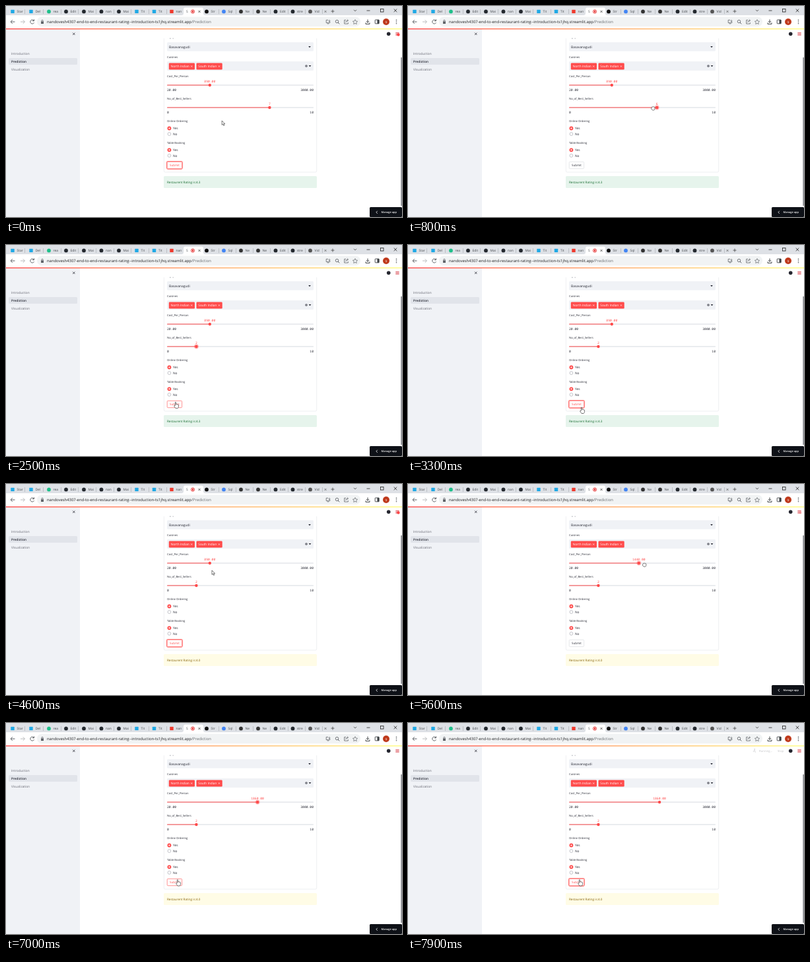
Write an HTML page that moves like this. It is 600 px wide and 320 px high and loops after 8 s.

```html
<!DOCTYPE html>
<html lang="en">
<head>
<meta charset="utf-8">
<title>Rating form</title>
<style>
html, body { margin: 0; width: 100%; height: 100%; overflow: hidden; background: #fff; }
svg { display: block; width: 600px; height: 320px; }
text { font-family: "Open Sans", "Noto Sans", sans-serif; text-rendering: geometricPrecision; white-space: pre; }
.mono { font-family: "Noto Sans Mono", "DejaVu Sans Mono", monospace; }
</style>
</head>
<body>
<svg id="stage" viewBox="0 0 600 320">
  <linearGradient id="glow">
    <stop offset="0" stop-color="#ff4b4b"/>
    <stop offset="1" stop-color="#fffd80"/>
  </linearGradient>
</svg>
<script>
const stage = document.getElementById("stage");
const RED = "#ff4b4b", INK = "#262833", GREY = "#5f6368", PANEL = "#f0f2f6";
const DURATION = 8000;

function add(tag, attrs, parent = stage) {
  const el = document.createElementNS("http://www.w3.org/2000/svg", tag);
  set(el, attrs);
  parent.appendChild(el);
  return el;
}
function set(el, attrs) {
  for (const k in attrs) el.setAttribute(k, attrs[k]);
}
const rect = (x, y, width, height, fill, rx = 0, more = {}) =>
  add("rect", { x, y, width, height, fill, rx, ...more });
const circle = (cx, cy, r, fill, more = {}) => add("circle", { cx, cy, r, fill, ...more });
const line = (d, stroke, w = 0.8, more = {}) =>
  add("path", { d, stroke, "stroke-width": w, fill: "none", ...more });
function text(str, x, y, size, fill = INK, more = {}) {
  const el = add("text", { x, y, "font-size": size, fill, ...more });
  el.textContent = str;
  return el;
}
const cross = (x, y, r, color, w) =>
  line(`M${x - r} ${y - r}l${2 * r} ${2 * r}m0 ${-2 * r}l${-2 * r} ${2 * r}`, color, w);
const caret = (x, y) => add("path", { d: `M${x - 1.8} ${y - 1}h3.6l-1.8 2.2z`, fill: INK });

// Browser tabs
const BLUE = "#20a9e5", DARK = "#24292f";
function drawTabs() {
  rect(0, 0, 600, 14, "#dee1e6");
  add("path", { d: "M266 14q3 0 3-3V5q0-2.5 2.5-2.5h25q2.5 0 2.5 2.5v6q0 3 3 3z", fill: "#fff" });
  const tabs = [
    [10, BLUE, "Star"], [38, BLUE, "Del"], [65, "#1fc08a", "rea"], [91, DARK, "Edit"],
    [118, DARK, "Mai"], [144.5, DARK, "nan"], [171, DARK, "Mai"], [198, BLUE, "Tit"],
    [224.5, BLUE, "Tit"], [251, "#ef3a2d", "nan"], [304, "#111", "Str"], [330, "#4285f4", "Sql"],
    [356, "#333", "Ne"], [382, "#333", "Ne"], [408.5, DARK, "Edit"], [434.5, DARK, "stre"],
    [461, "#555", "Vid"]
  ];
  tabs.forEach(([x, color, name], i) => {
    if (color === BLUE || color === "#ef3a2d") rect(x - 2.7, 5.7, 5.4, 5.4, color, 0.6);
    else circle(x, 8.4, 2.9, color);
    text(name, x + 6.5, 10.2, 4.9, "#45494d");
    if (i !== 9) rect(x + 18.5, 5, 0.5, 7, "#9da1a6");
  });
  text("S", 273, 10.2, 4.9, "#45494d");
  circle(283, 8.4, 2.6, "none", { stroke: "#e52b2b", "stroke-width": 0.9 });
  circle(283, 8.4, 1.3, "#e52b2b");
  cross(293, 8.4, 1.6, "#444", 0.8);
  cross(484, 8.4, 1.5, "#555", 0.7);
  line("M492.5 8h5m-2.5-2.5v5", "#444");
  line("M527 5.8l2 2 2-2", "#333");
  line("M546.5 7h5", "#222");
  rect(567.5, 4.5, 4.5, 4.5, "none", 0, { stroke: "#222", "stroke-width": 0.8 });
  cross(590, 6.8, 2.3, "#222", 0.8);
}

// Toolbar with the address
function drawToolbar() {
  rect(0, 14, 600, 20, "#fff");
  rect(47, 16.5, 490, 14.5, "#f1f3f4", 7.2);
  line("M13.5 24h-6.5m2.8-2.8l-2.8 2.8 2.8 2.8", GREY, 1);
  line("M22 24h6.5m-2.8-2.8l2.8 2.8-2.8 2.8", "#babcbe", 1);
  line("M42.3 22.3a3 3 0 1 0 .2 3m0-5v2.4h-2.4", GREY, 1);
  rect(53, 23.3, 4, 3.7, GREY, 0.5);
  line("M53.8 23.5v-1.1a1.2 1.2 0 0 1 2.4 0v1.1", GREY);
  const url = text("", 62, 26, 5.9, "#202124");
  add("tspan", {}, url).textContent =
    "nandovesh4307-end-to-end-restaurant-rating--introduction-ts1jhq.streamlit.app";
  add("tspan", { fill: "#686c70" }, url).textContent = "/Prediction";

  line("M488 21.3h-2.8v4.2h5.600v-1.500m-4.200 2.900h2.800m.6-6v3m-1.300-1.300l1.300 1.300 1.300-1.300", GREY);
  circle(501.5, 23.5, 2.2, "none", { stroke: GREY, "stroke-width": 0.9 });
  line("M503 25l2.3 2.3", GREY, 1);
  line("M515 21.3h-2.3v5.7h5.6v-2m-3.6 0q0-3 3.6-3m-1.6-1.7l1.8 1.7-1.8 1.7", GREY);
  line("M529 20.6l1.1 2.3 2.5.3-1.8 1.8.4 2.5-2.2-1.2-2.2 1.2.4-2.5-1.8-1.8 2.5-.3z", GREY, 0.7);
  line("M548 20.5v4.5m-2-1.8l2 2 2-2m-5 2.2v1.9h6v-1.9", "#3c4043", 1);
  rect(559.2, 21, 6, 5.8, "none", 0.6, { stroke: "#3c4043", "stroke-width": 0.9 });
  rect(562.5, 21, 2.7, 5.8, "#3c4043");
  circle(576, 24, 5, "#bf3a1c");
  text("s", 576, 25.9, 5.5, "#fff", { "text-anchor": "middle" });
  for (const y of [21.4, 24, 26.6]) circle(591.5, y, 0.8, GREY);
}

function drawSidebar() {
  rect(0, 34, 112, 286, PANEL);
  cross(102.8, 42.3, 1.7, INK, 0.8);
  rect(4, 79, 104, 10, "#e1e4ea", 1.5);
  text("Introduction", 8, 74, 4.8, "#686a74");
  text("Prediction", 8, 86, 4.7, INK, { "font-weight": 600 });
  text("Visualization", 8, 98, 4.8, "#686a74");
}

function tag(x, width, name) {
  rect(x, 86.5, width, 10, RED, 1.3);
  text(name, x + 2.8, 93.3, 4.75, "#fff");
  cross(x + width - 4.8, 91.5, 1.1, "#fff", 0.6);
}

function makeSlider(y, min, max, label) {
  text(label, 244, y - 12.1, 4.2);
  rect(244, y - 0.6, 222, 1.2, "#d6dadf", 0.6);
  const fill = rect(244, y - 0.6, 10, 1.2, RED, 0.6);
  const halo = circle(0, y, 3.4, RED, { opacity: 0.4 });
  const thumb = circle(0, y, 2.2, RED);
  const value = text("", 0, y - 4, 4.7, RED, { class: "mono", "text-anchor": "middle" });
  text(min, 244, y + 8.9, 4.7, INK, { class: "mono" });
  text(max, 466, y + 8.9, 4.7, INK, { class: "mono", "text-anchor": "end" });
  return (x, str, focused) => {
    set(fill, { width: x - 244 });
    set(thumb, { cx: x });
    set(halo, { cx: x, visibility: focused ? "visible" : "hidden" });
    set(value, { x });
    value.textContent = str;
  };
}

function radio(y, label) {
  text(label, 244, y - 9.3, 4.2);
  circle(247.4, y, 2.9, RED);
  circle(247.4, y, 1.1, "#fff");
  text("Yes", 253, y + 1.8, 4.8);
  circle(247.4, y + 8.6, 2.4, "#fff", { stroke: "#a9abb3", "stroke-width": 0.7 });
  text("No", 253, y + 10.4, 4.8);
}

drawTabs();
drawToolbar();
drawSidebar();
rect(0, 34, 600, 1.4, "url(#glow)");

// Form
line("M239.3 49v201q0 2 2 2h227.4q2 0 2-2V49", "#e3e4e9", 0.6);
line("M248 49.2h1.6m3 0h1.2", "#8b8d96", 0.8);
rect(244, 55, 222, 13.5, PANEL, 1.5);
text("Basavanagudi", 247, 63.5, 4.9);
caret(460, 62);
text("Cuisines", 244, 79, 4.2);
rect(244, 84, 222, 14, PANEL, 1.5);
tag(246.8, 39.2, "North Indian");
tag(288.5, 39.2, "South Indian");
circle(455, 91, 1.8, "#5c5e68");
cross(455, 91, 0.6, "#fff", 0.4);
caret(460.5, 91);
const setCost = makeSlider(120, "20.00", "3000.00", "Cost_Per_Person");
const setSellers = makeSlider(154, "0", "10", "No_of_Best_Sellers");
radio(185.5, "Online Ordering");
radio(218.3, "Table Booking");
const ring = rect(243.5, 235.7, 23.8, 11.6, "none", 1.8, { stroke: "#ff8585", "stroke-width": 1.2 });
const button = rect(244.2, 236.3, 22.4, 10.4, "#fff", 1.3, { "stroke-width": 0.6 });
const submit = text("Submit", 255.4, 243.1, 4.5, INK, { "text-anchor": "middle" });
const resultBox = rect(239, 258, 232, 18, "#e6f4ec", 1.5);
const result = text("", 244, 268.6, 4.6);

// Page header and corner controls
circle(579.7, 42.3, 2.8, "#262730");
line("M590.3 40.6h5.4m-5.4 1.8h5.4m-5.4 1.8h5.4", "#d32c36", 0.8);
const pulse = circle(594.5, 43.5, 2.2, "#ff2b2b");
const running = add("g", { opacity: 0.28 });
running.append(
  circle(525.2, 39.8, 0.8, INK),
  line("M524.6 41.3l-1.4 2.6m1.4-2.6l1.8 1.2m-1.3.2l1.4 2", INK, 0.7),
  text("Running...", 532, 44, 4.3),
  text("Stop", 560, 44, 4.3)
);
rect(598.3, 78, 1.7, 225, "#8d8f94");
rect(551, 305, 49, 15, "#0e1117", 1.5);
line("M562.8 310.8l-1.9 2 1.9 2", "#fff", 0.8);
text("Manage app", 568.5, 314.4, 3.95, "#fff", { "font-weight": 600 });

// Pointers, drawn with the hot spot at the origin
const pointer = d => add("path", { d, fill: "#fff", stroke: "#222", "stroke-width": 0.6 });
const arrow = pointer("M0 0v6.4l1.5-1.3 1.1 2.4 1.1-.5-1.1-2.3h2z");
const hand = pointer("M-.8 5V.4q0-.8.7-.8t.7.8v2.7q.8-.5 1.4.1.8-.4 1.3.2 1-.3 1.1.8v2.2q0 1.8-1.2 2.6H0L-2.4 5.6q0-1 1.6-.6z");
const fist = pointer("M-2 0q.2-1.5 1.3-1.3.6-.7 1.3-.1.8-.4 1.3.3 1-.1 1 1v1.8q-.2 1.6-1.3 2h-2q-1.7-.9-2.1-2.2z");

// Pointer way points: time, x, y
const path = [
  [0, 327, 174], [500, 399, 154], [650, 399, 154], [1250, 288, 155], [1400, 288, 156],
  [1500, 290, 162], [2400, 255, 236], [2800, 263, 246.5], [3900, 263, 246.5], [4600, 312, 131],
  [4850, 308, 121], [5000, 308, 121], [5880, 381, 122], [6200, 381, 122],
  [6850, 260, 238], [8000, 260, 238]
];
function pointerAt(t) {
  const i = Math.max(1, path.findIndex(p => p[0] >= t));
  const [t0, x0, y0] = path[i - 1], [t1, x1, y1] = path[i];
  const k = (t - t0) / (t1 - t0);
  return [x0 + (x1 - x0) * k, y0 + (y1 - y0) * k];
}
const within = (t, a, b) => t >= a && t < b;
const clamp = (v, a, b) => Math.min(b, Math.max(a, v));
const show = (el, on) => set(el, { visibility: on ? "visible" : "hidden" });

function render(t) {
  const [x, y] = pointerAt(t);

  const sellers = t < 650 ? 7 : Math.round(clamp((pointerAt(Math.min(t, 1300))[0] - 244) / 22.2, 2, 7));
  setSellers(244 + sellers * 22.2, sellers, within(t, 600, 3200));

  const dragX = clamp(pointerAt(clamp(t - 100, 5000, 6200))[0], 308.8, 381);
  const cost = Math.round(((dragX - 244) / 222 * 2980 + 20) / 10) * 10;
  setCost(244 + (cost - 20) / 2980 * 222, cost.toFixed(2), within(t, 5000, 7300));

  const focused = t < 600 || within(t, 3200, 5000) || t >= 7300;
  const overButton = x > 244 && x < 267.5 && y > 235.5 && y < 247.5;
  const active = focused || overButton;
  show(ring, focused);
  set(button, { stroke: active ? RED : "#d6d7dc" });
  set(submit, { fill: active ? RED : INK });

  const updated = t >= 3800;
  set(resultBox, { fill: updated ? "#fffce6" : "#e6f4ec" });
  set(result, { fill: updated ? "#856205" : "#136a2d" });
  result.textContent = "Restaurent Rating is:" + (updated ? "4.0" : "4.3");

  show(running, within(t, 3500, 3900) || t >= 7700);
  set(pulse, { opacity: Math.max(0, 0.8 - t % 920 / 120) });

  const dragging = within(t, 600, 1350) || within(t, 4950, 6200);
  show(fist, dragging);
  show(hand, !dragging && overButton);
  show(arrow, !dragging && !overButton);
  for (const el of [arrow, hand, fist]) set(el, { transform: `translate(${x} ${y})` });
}

const start = performance.now();
function tick() {
  render((performance.now() - start) % DURATION);
  requestAnimationFrame(tick);
}
tick();
</script>
</body>
</html>
```
